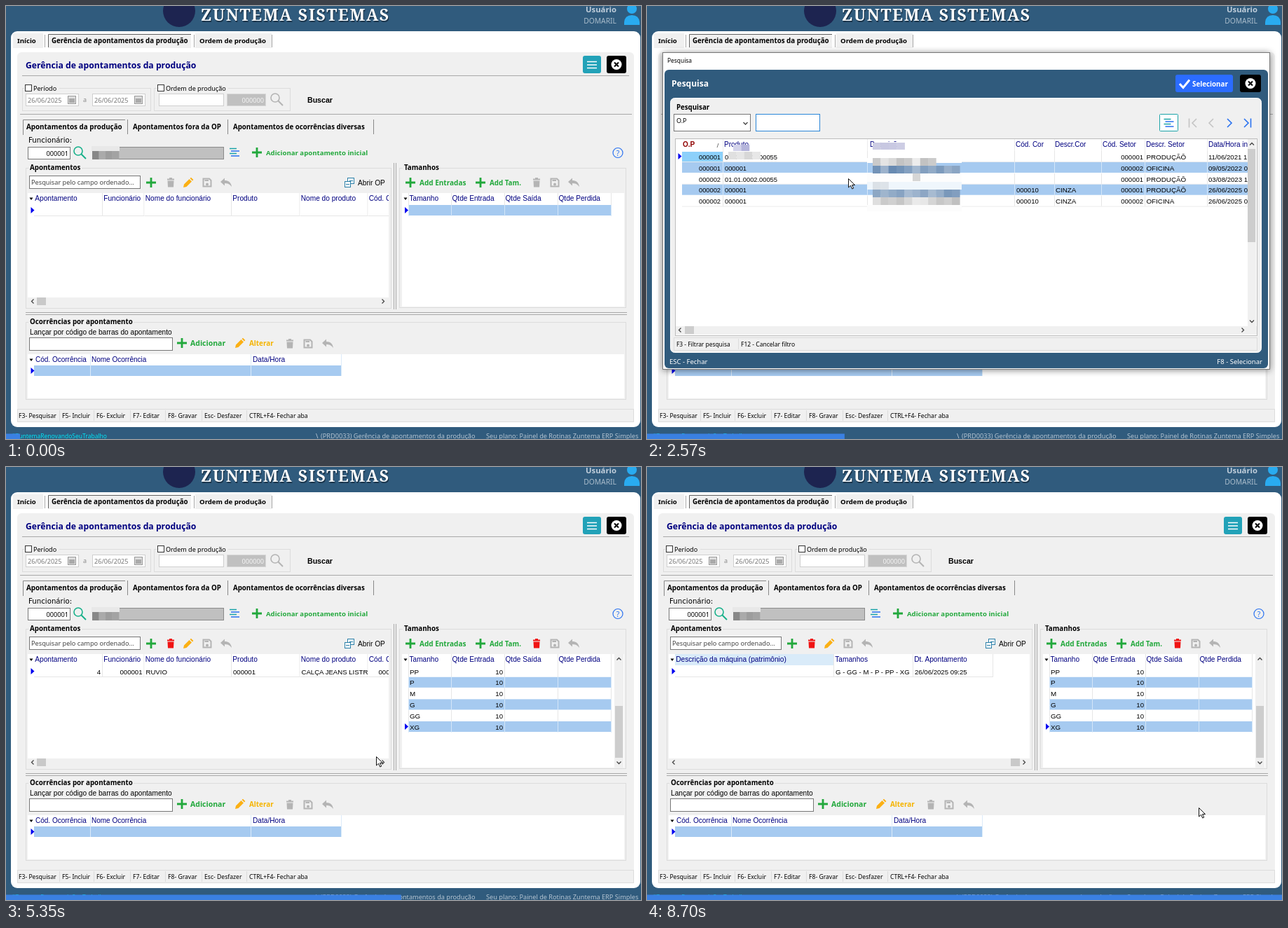
An HTML page for the animation above (8900 ms loop, 906x618 px).

```html
<!DOCTYPE html>
<html lang="pt-BR">
<head>
<meta charset="utf-8">
<title>Apontamentos da produção</title>
<style>
html, body { margin: 0; width: 100%; height: 100%; overflow: hidden; background: #305b7d; }
#stage { display: block; }
text { white-space: pre; }
.a { font-family: "Liberation Sans", Arial, sans-serif; }
.ab { font-family: "Liberation Sans", Arial, sans-serif; font-weight: bold; }
.s { font-family: "Noto Sans", sans-serif; }
.b { font-family: "Noto Sans", sans-serif; font-weight: bold; }
.d { font-family: "DejaVu Sans", sans-serif; }
.logo { font-family: "Noto Serif", serif; font-weight: bold; letter-spacing: 1.6px; }
.shadow { filter: drop-shadow(0 1px 5px #0007); }
</style>
</head>
<body>
<svg id="stage" width="906" height="618" viewBox="0 0 906 618"></svg>
<script>
const LOOP = 8900, STEP = 198, STEPS = 45;
// Steps at which the interface changes state
const BUSY = 6, OPEN = 9, PICK = 20, CLOSE = 23;
const NAVY = '#000080', PANEL = '#f0f0f0', ROW = '#a6caf0', HOT = '#d9ebf9', BRAND = '#305b7d';
const GREEN = '#22a83c', GREY = '#b4b4b4', BLUE = '#2a72f0', TEAL = '#1ba3a8', LINE = '#a8a8a8', FAINT = '#dcdcdc';

// Drawing helpers, all returning SVG markup
const text = (x, y, s, font = 'a', size = 10.15, fill = '#000', anchor = 'start') =>
  `<text x="${x}" y="${y}" class="${font}" font-size="${size}" fill="${fill}" text-anchor="${anchor}">${s}</text>`;
const box = (x, y, w, h, fill, stroke, r = 0) => stroke
  ? `<rect x="${x + .5}" y="${y + .5}" width="${w - 1}" height="${h - 1}" rx="${r}" fill="${fill}" stroke="${stroke}"/>`
  : `<rect x="${x}" y="${y}" width="${w}" height="${h}" rx="${r}" fill="${fill}"/>`;
const line = (d, stroke, width = 1) => `<path d="${d}" fill="none" stroke="${stroke}" stroke-width="${width}"/>`;
const shape = (d, fill) => `<path d="${d}" fill="${fill}"/>`;
const at = (x, y, inner) => `<g transform="translate(${x} ${y})">${inner}</g>`;
const circle = (x, y, r, fill, extra = '') => `<circle cx="${x}" cy="${y}" r="${r}" fill="${fill}" ${extra}/>`;
const clip = (x, y, w, h, inner) => `<svg x="${x}" y="${y}" width="${w}" height="${h}">${inner}</svg>`;
const each = (list, fn) => list.map(fn).join('');

// Icons
const plus = (x, y) => line(`M${x - 7} ${y}h14M${x} ${y - 7}v14`, GREEN, 2.8);
const trash = (x, y, c) => at(x, y, shape('M-5-5.5h3v-1.5h4v1.5h3v2h-10zM-4.5-2.5h9l-.5 9h-8z', c));
const pencil = (x, y) => at(x, y, shape('M-7 7l1-4.5 7.5-7.5 3.5 3.5-7.5 7.5zM2.5-6l1.5-1.3 3.4 3.4-1.4 1.4z', '#fbb014'));
const disk = (x, y) => at(x, y, line('M-5.5-5.5h8.5l2.5 2.5v8.5h-11zM-3.5-3h5.5', GREY, 2) + circle(0, 2.4, 2, GREY));
const undo = (x, y) => at(x, y, shape('M-8-1l6-5.5v3.5c6 0 9 3 10 9-3-4-6-5-10-5v3.5z', GREY));
const lens = (x, y, c) => circle(x, y, 6, 'none', `stroke="${c}" stroke-width="1.6"`) + line(`M${x + 4.5} ${y + 4.5}l6.5 6.5`, c, 2);
const list = (x, y) => at(x, y, line('M-6-5.5h10M-6 1.5h10', TEAL, 1.3) + line('M-4-2h12M-4 5h12', BLUE, 1.3));
const marker = (x, y) => shape(`M${x - 2.5} ${y - 4.5}l5 4.5-5 4.5z`, '#0000f0');
const sortMark = (x, y) => shape(`M${x - 2.5} ${y - 1.5}h5l-2.5 3.5z`, '#000');
const arrow = (x, y, angle, c = '#444', size = 1, width = 1.3) =>
  `<path d="M${-1.5 * size} ${-3 * size}l${3 * size} ${3 * size}l${-3 * size} ${3 * size}" fill="none" stroke="${c}" stroke-width="${width}" transform="translate(${x} ${y}) rotate(${angle})"/>`;
const RIGHT = 0, DOWN = 90, LEFT = 180, UP = 270;
const closeButton = (x, y, w) => box(x, y, w, 25, '#000', '', 3) + circle(x + w / 2, y + 12.5, 7.5, '#fff') +
  at(x + w / 2, y + 12.5, line('M-3-3l6 6M3-3l-6 6', '#000', 2));
const calendar = (x, y) => box(x, y, 12, 12, '#ddd', '#999') + box(x + 2, y + 4, 8, 6, '#aaa');

const noise = i => Math.abs(Math.sin(i * 12.9898) * 43758.5453) % 1;
const mosaic = (x, y, cols, w, h, color, low, high, seed) =>
  each([...Array(cols).keys()], i => box(x + i * w, y, w + .3, h, `hsl(${color} ${low + (high - low) * noise(seed + i)}%)`));

const group = (x, y, w, h, label, lx, lw) =>
  box(x, y, w, h, 'none', FAINT) + box(lx - 2, y - 4, lw, 9, PANEL) + text(lx, y + 3.3, label, 'b', 9.75);

// title, width, value, right-aligned
const COLUMNS = [
  ['Apontamento', 98, '4', 1], ['Funcionário', 59.5, '000001', 1], ['Nome do funcionário', 124.5, 'RUVIO'],
  ['Produto', 97.5, '000001'], ['Nome do produto', 97, 'CALÇA JEANS LISTRADA'], ['Cód. Cor', 50, '000001', 1],
  ['Cor', 76, '000010'], ['Nome da cor', 152, 'CINZA'], ['Processo', 48, '0000001', 1],
  ['Nome do processo', 108, 'PRODUÇÃÕ'], ['Qtde Entrada', 84, '60', 1], ['Qtde Saída', 84, ''],
  ['Qtde Perdida', 84, ''], ['Qtde Conserto', 84, ''], ['Cód. Máquina', 84, ''], ['Patrimônio', 84, ''],
  ['Descrição da máquina (patrimônio)', 227, ''], ['Tamanhos', 113, 'G - GG - M - P - PP - XG'],
  ['Dt. Apontamento', 114, '26/06/2025 09:25']
];
const SIZES = ['PP', 'P', 'M', 'G', 'GG', 'XG'];
const ORDERS = [
  ['000001', '01.01.0001.00055', 0, '000001', 'PRODUÇÃÕ', '11/06/2021 1'],
  ['000001', '000001', 0, '000002', 'OFICINA', '09/05/2022 0'],
  ['000002', '01.01.0002.00055', 0, '000001', 'PRODUÇÃÕ', '03/08/2023 1'],
  ['000002', '000001', 1, '000001', 'PRODUÇÃÕ', '26/06/2025 0'],
  ['000002', '000001', 1, '000002', 'OFICINA', '26/06/2025 0']
];
// step, x, y of the pointer tip
const POINTER = [
  [1, 766, 480], [3, 400, 500], [4, 365, 274], [5, 354, 206], [OPEN, 354, 206], [13, 287, 246], [15, 287, 246],
  [19, 262, 257], [CLOSE, 262, 257], [27, 528, 413], [29, 532, 420], [42, 532, 420], [43, 650, 268], [44, 787, 486]
];

// Number of columns scrolled away: slow clicks first, then faster
const scrolled = n => n < 29 ? 0 : n <= 37 ? Math.round((n - 28) * 2 / 3) : Math.min(16, 6 + 2 * (n - 37));

function header() {
  return box(0, 0, 906, 618, BRAND) + circle(247, 7, 23, '#1d2450') +
    text(279, 22.5, 'ZUNTEMA SISTEMAS', 'logo', 23, '#1b3348') + text(278, 21, 'ZUNTEMA SISTEMAS', 'logo', 23, '#fff') +
    text(871, 9, 'Usuário', 'b', 11.3, '#c0cedb', 'end') + text(871, 25, 'DOMARIL', 's', 10.3, '#a9bccb', 'end') +
    circle(893, 4, 7, '#29abf0') + shape('M882 27v-4q1-10 11-10t11 10v4z', '#29abf0') +
    box(7, 36, 898, 565, '#fff', '', 9) +
    box(10, 39, 43, 21, PANEL) + line('M55.5 41v18M268.5 41v18M379.5 41v18', LINE) +
    box(60, 40, 204, 20, PANEL) + line('M60.5 59V40.5H264', '#606060') + box(270, 39, 109, 21, PANEL) +
    text(16, 53, 'Início', 'b', 9.6) + text(65, 53, 'Gerência de apontamentos da produção', 'b', 9.75) +
    text(276, 53, 'Ordem de produção', 'b', 9.6) +
    box(16, 66, 880, 528, PANEL, '', 6);
}

function filters(busy) {
  const dateField = x => box(x, 125, 76, 18, '#fff', '#cfcfcf') + text(x + 3, 138, '26/06/2025', 's', 9.15, '#777') + calendar(x + 60, 128);
  return text(28, 89, 'Gerência de apontamentos da produção', 'b', 12.2, NAVY) +
    box(823, 71, 26, 25, '#22a2b8', '', 3) + line('M829 79.5h14M829 84h14M829 88.5h14', '#fff', 1.4) + closeButton(857, 71, 28) +
    line('M23 99.5h866M20 154.5h873', LINE) +
    box(23, 117, 184, 33, 'none', FAINT) + box(211, 117, 195, 33, 'none', FAINT) +
    box(26, 111, 50, 13, PANEL) + box(215, 111, 102, 13, PANEL) +
    box(27, 112, 10, 10, '#fff', '#333') + box(216, 112, 10, 10, '#fff', '#333') +
    text(39, 121, 'Período', 's', 9.05) + text(228, 121, 'Ordem de produção', 's', 9.05) +
    (busy ? '<rect x="38.5" y="111.5" width="34" height="11" fill="none" stroke="#555" stroke-dasharray="1 1"/>' : '') +
    dateField(28) + text(110, 137, 'a', 's', 9, '#888') + dateField(123) +
    box(218, 125, 93, 18, '#fff', '#cfcfcf') + box(315, 125, 56, 18, '#c0c0c0', '#d8d8d8') +
    text(368, 138, '000000', 's', 9.2, '#f4f4f4', 'end') + lens(384, 131, GREY) + text(430, 138, 'Buscar', 'ab', 10.6) +
    line('M24.5 184V162.5H170M173.5 162v21M316.5 162v21M524.5 162v21', '#888') +
    text(29, 176, 'Apontamentos da produção', 'b', 9.85) + text(181, 176, 'Apontamentos fora da OP', 'b', 9.75) +
    text(324, 176, 'Apontamentos de ocorrências diversas', 'b', 9.7) +
    text(32, 195, 'Funcionário:', 'd', 10.2) + box(31, 201, 61, 18, '#fff', '#777') + text(89, 214, '000001', 's', 9.2, '#000', 'end') +
    lens(103, 207, '#17b08a') + box(123, 201, 188, 18, '#c0c0c0', '#8a8a8a') +
    box(122, 200, 40, 7, '#e8e8e8') + mosaic(123, 207, 4, 9.5, 12, '0 0%', 52, 78, 2) + list(325, 209) +
    (busy ? '' : plus(358, 209) + text(371, 212.5, 'Adicionar apontamento inicial', 'b', 9.6, GREEN)) +
    circle(873, 209.5, 7, 'none', `stroke="${BLUE}" stroke-width="1.2"`) + text(873, 213.5, '?', 's', 10.5, BLUE, 'middle');
}

function entries(n, filled, hotColumn) {
  const first = scrolled(n), pressed = first !== scrolled(n - 1), thumb = 44 + first * 475 / 16;
  let x = 0, cells = '';
  for (let i = first; i < COLUMNS.length && x < 506; i++) {
    const [title, w, value, right] = COLUMNS[i];
    cells += clip(x, 0, w, 33, (i === hotColumn ? box(0, 0, w, 16, HOT) : '') +
      box(w - 1, 0, 1, 33, '#e6e6e6') + box(0, 32, w, 1, '#e6e6e6') + text(1.3, 11, title, 'a', 10.15, NAVY) +
      (filled ? text(right ? w - 3 : 2, 28.5, value, 'a', 9.6, '#000', right ? 'end' : 'start') : ''));
    x += w;
  }
  return group(28, 231, 522, 201, 'Apontamentos', 34, 76) + box(33, 242, 159, 19, '#fff', '#777') +
    text(36, 255, 'Pesquisar pelo campo ordenado...', 's', 9.2, '#444') +
    plus(207, 252) + trash(235, 252, filled ? '#f01414' : GREY) + pencil(260, 252) + disk(287, 252) + undo(314, 252) +
    box(487, 245, 10, 9, '#fff', '#2b7fa8') + box(483, 250, 9, 9, '#fff', '#2b7fa8') + line('M485 254.5h5M490 249.5h5', '#2b7fa8') +
    text(502, 255.5, 'Abrir OP') + box(31, 267, 515, 149, '#fff') + sortMark(36, 275) + marker(38, 291.5) +
    clip(40, 267, 506, 33, cells) + arrow(38, 421.5, LEFT) + box(thumb, 416, 13, 11, '#c9c9c9') +
    (pressed ? box(532, 416, 13, 11, '#606060') : '') + arrow(538, 421.5, RIGHT, pressed ? '#fff' : '#444');
}

function sizes(filled) {
  const edges = [574, 635, 711, 787, 863];
  const rows = each(filled ? SIZES : [''], (name, i) => {
    const y = 284 + 15.8 * i, blue = !filled || i % 2;
    return (blue ? box(574, y, 289, 15, ROW) : '') + each(edges, x => box(x, y, 1, 15.8, blue ? '#d4e6f8' : '#e6e6e6')) +
      text(576, y + 11.5, name, 'a', 9.8) + (filled ? text(709, y + 11.5, '10', 'a', 9.6, '#000', 'end') : '');
  });
  return group(561, 231, 324, 200, 'Tamanhos', 568, 52) + plus(577, 252) + text(590, 255.5, 'Add Entradas', 'b', 10, GREEN) +
    plus(677, 252) + text(690, 255.5, 'Add Tam.', 'b', 9.8, GREEN) +
    trash(757, 252, filled ? '#f01414' : GREY) + disk(783, 252) + undo(810, 252) +
    box(565, 267, 317, 162, '#fff') + sortMark(570, 275) +
    each(['Tamanho', 'Qtde Entrada', 'Qtde Saída', 'Qtde Perdida'], (s, i) => text(edges[i] + 1.5, 278, s, 'a', 10.1, NAVY)) +
    each(edges, x => box(x, 267, 1, 17, '#e6e6e6')) + rows + marker(571.5, filled ? 370.5 : 291.5) +
    (filled ? box(868, 267, 13, 162, PANEL) + box(869, 341, 11, 74, '#cdcdcd') + arrow(874.5, 274, UP) + arrow(874.5, 422, DOWN) : '');
}

function occurrences(hot) {
  return line('M553.5 224v209M556.5 224v209M28 437.5h858M28 440.5h858', LINE) +
    group(28, 451, 857, 111, 'Ocorrências por apontamento', 34, 150) +
    text(34, 469, 'Lançar por código de barras do apontamento') + box(33, 473, 205, 19, '#fff', '#777') +
    plus(251, 481) + text(263, 485, 'Adicionar', 'b', 10.5, GREEN) + pencil(334, 481) + text(347, 485, 'Alterar', 'b', 9.9, '#f5b400') +
    trash(405, 482, GREY) + disk(431, 482) + undo(459, 482) + box(31, 497, 851, 63, '#fff') +
    (hot ? box(350, 497, 128, 16, HOT) : '') + sortMark(36, 505) +
    text(42, 508, 'Cód. Ocorrência', 'a', 10, NAVY) + text(122, 508, 'Nome Ocorrência', 'a', 10, NAVY) + text(352, 508, 'Data/Hora', 'a', 10.15, NAVY) +
    box(40, 513, 438, 15, ROW) + each([120, 349, 478], x => box(x, 497, 1, 31, '#dcebf9')) + marker(38, 520.5) +
    box(16, 575, 880, 19, PANEL, FAINT) +
    each([[18, 'F3- Pesquisar'], [80, 'F5- Incluir'], [129, 'F6- Excluir'], [181, 'F7- Editar'], [231, 'F8- Gravar'], [283, 'Esc- Desfazer'], [347, 'CTRL+F4- Fechar aba']],
      ([x, s]) => text(x, 588, s, 's', 8.6) + (x > 18 ? box(x - 4, 577, 1, 15, FAINT) : ''));
}

function dialog(n) {
  const picked = n >= PICK, lineX = [108, 314, 524, 581, 648, 710, 799];
  const caret = !picked && Math.floor(n / 3) % 2;
  const dim = picked ? BLUE : '#c4c4c4';
  const nav = (x, c, angle) => arrow(x, 167, angle, c, 2, 1.6);
  const rows = each(ORDERS, ([op, product, tint, sector, place, date], i) => {
    const y = 207 + 15.9 * i, base = y + 11.7, blue = i % 2;
    return (blue ? box(50, y, 807, 15, ROW) : box(50, y + 15, 807, 1, '#ececec')) +
      (!picked && i === 0 ? box(50, y + 1, 58, 14, '#8cd0fa') : '') +
      (picked && i === 3 ? box(109, y, 205, 15, '#8cd0fa', '#222') : '') +
      each(lineX, x => box(x, y, 1, 15, blue ? '#d4e6f8' : '#e6e6e6')) +
      text(105, base, op, 'a', 9.3, '#000', 'end') + text(111, base, product, 'a', 9.3) +
      (tint ? text(527, base, '000010', 'a', 9.5) + text(583, base, 'CINZA', 'a', 9.8) : '') +
      text(708, base, sector, 'a', 9.5, '#000', 'end') + text(712.5, base, place, 'a', 9.8) + text(801, base, date, 'a', 9.6);
  });
  const blur = mosaic(123, 198, 2, 11.5, 9, '240 35%', 78, 88, 1) + mosaic(116, 208, 4, 11.4, 11, '0 0%', 82, 95, 5) +
    mosaic(322, 195, 4, 11.4, 10, '240 30%', 80, 88, 3) +
    box(314, 217, 135, 7, '#fff') + mosaic(322, 217, 8, 11.3, 11, '0 0%', 76, 96, 7) +
    mosaic(322, 228, 11, 11.3, 11, '212 32%', 55, 74, 11) + box(314, 239, 135, 12, '#fdfdfd') + box(379, 239, 11, 11, '#d6d6d6') +
    box(314, 251, 135, 11, '#eff6fc') + mosaic(322, 251, 2, 11.3, 11, '210 20%', 84, 95, 4) +
    mosaic(322, 262, 11, 11.3, 11, '212 32%', 55, 74, 23) + mosaic(322, 273, 11, 11.3, 11, '0 0%', 74, 92, 31) + box(314, 284, 135, 9, '#fcfcfc');
  return `<g class="shadow">${box(22, 66, 867, 453, '#fff', '#777')}</g>` + text(29, 81, 'Pesquisa', 's', 8.4) +
    box(25, 91, 861, 426, BRAND, '', 6) + text(35, 115, 'Pesquisa', 'b', 12, '#fff') +
    box(754, 98, 82, 25, '#2b6cff', '', 3) + line('M760 111l5 5.5 9-11', '#fff', 3) + text(778, 115, 'Selecionar', 'b', 9.8, '#fff') +
    closeButton(846, 98, 30) + box(33, 131, 844, 364, PANEL, '#fff', 6) + text(42, 148, 'Pesquisar', 'b', 9.7) +
    box(38, 154, 110, 25, '#fff', '#777') + text(42, 167, 'O.P', 's', 9) + arrow(140.5, 167.5, DOWN) +
    box(155, 154, 92, 25, '#fff', '#2a86d8') + (picked ? text(244, 170, '0', 's', 12, '#000', 'end') : '') +
    (caret ? box(243, 158, 1, 17, '#000') : '') +
    box(731, 154, 27, 25, '#fff', TEAL, 1) + list(743.5, 167) +
    line('M773.5 160.5v13', dim, 1.6) + nav(781, dim, LEFT) + nav(805, dim, LEFT) +
    nav(831, BLUE, RIGHT) + nav(855, BLUE, RIGHT) + line('M861.5 160.5v13', BLUE, 1.6) +
    box(40, 189, 831, 282, '#fff', '#bdbdbd') + text(51, 201, 'O.P', 'ab', 10, '#900000') + line('M100 202l2-6', '#777') +
    each([[110, 'Produto'], [318, 'Descrição'], [526, 'Cód. Cor'], [582, 'Descr.Cor'], [650, 'Cód. Setor'], [712, 'Descr. Setor'], [801, 'Data/Hora in']],
      ([x, s]) => text(x, 201, s, 'a', 10, NAVY)) +
    each(lineX, x => box(x, 190, 1, 17, '#ececec')) + rows + marker(47, picked ? 262 : 214.5) + blur +
    box(857, 190, 12, 267, PANEL) + box(857, picked ? 283 : 204, 11, 133, '#cdcdcd') + arrow(863, 197, UP) + arrow(863, 450, DOWN) +
    box(41, 457, 829, 12, PANEL) + box(54, 457, 13, 11, '#cdcdcd') + arrow(47, 462.5, LEFT) + arrow(850, 462.5, RIGHT) +
    box(38, 473, 833, 19, PANEL, FAINT) + box(130, 475, 1, 15, FAINT) +
    text(42, 486, 'F3 - Filtrar pesquisa', 's', 8.4) + text(134, 486, 'F12 - Cancelar filtro', 's', 8.5) +
    text(32, 511, 'ESC - Fechar', 's', 9.5, '#fff') + text(878, 511, 'F8 - Selecionar', 's', 9.5, '#fff', 'end');
}

function footer(n) {
  return text(144, 617, '#ZuntemaRenovandoSeuTrabalho', 's', 8.5, '#00e4f4', 'end') +
    text(442, 617, '\\', 's', 9.2, '#c3d0dc') + text(449, 617, '(PRD0033) Gerência de apontamentos da produção', 's', 9.18, '#b4c4d2') +
    text(685, 617, 'Seu plano: Painel de Rotinas Zuntema ERP Simples', 's', 9.18, '#b4c4d2') +
    box(0, 610.5, 906 * (n + 1) / STEPS, 8, '#3a80e2');
}

function pointer(n) {
  if (n < 1) return '';
  if (n >= BUSY && n < OPEN) return circle(355, 206, 5.7, '#fff', 'stroke="#2388d8" stroke-width="4.6"') +
    `<path d="M355 200.3a5.7 5.7 0 0 1 5.7 5.7" fill="none" stroke="#5cb4f0" stroke-width="4.6" transform="rotate(${n * 70} 355 206)"/>`;
  const k = Math.max(1, POINTER.findIndex(p => p[0] >= n));
  const [n0, x0, y0] = POINTER[k - 1], [n1, x1, y1] = POINTER[k];
  const f = (n - n0) / (n1 - n0), ease = f * f * (3 - 2 * f);
  const clicking = n === BUSY - 1 || n === PICK || scrolled(n) !== scrolled(n - 1);
  const x = x0 + (x1 - x0) * ease, y = y0 + (y1 - y0) * ease;
  return (clicking ? circle(x, y + 1, 10, '#f5e900', 'opacity=".65"') : '') +
    at(x, y, '<path d="M.5.5v12.5l3-2.8 2.2 4.8 2-.9-2.2-4.6h4z" fill="#fff" stroke="#111"/>');
}

function scene(n) {
  const filled = n >= CLOSE, busy = n >= BUSY && !filled;
  const hotColumn = scrolled(n) || (n >= 4 && !filled ? 3 : -1);
  return header() + filters(busy) + entries(n, filled, hotColumn) + sizes(filled) + occurrences(n >= 3 && !filled) +
    (n >= OPEN && !filled ? dialog(n) : '') + footer(n) + pointer(n);
}

const stage = document.getElementById('stage');
let shown = -1;
function tick() {
  const n = Math.min(STEPS - 1, Math.floor((performance.now() % LOOP + 12) / STEP));
  if (n !== shown) stage.innerHTML = scene(shown = n);
  requestAnimationFrame(tick);
}
tick();
</script>
</body>
</html>
```
